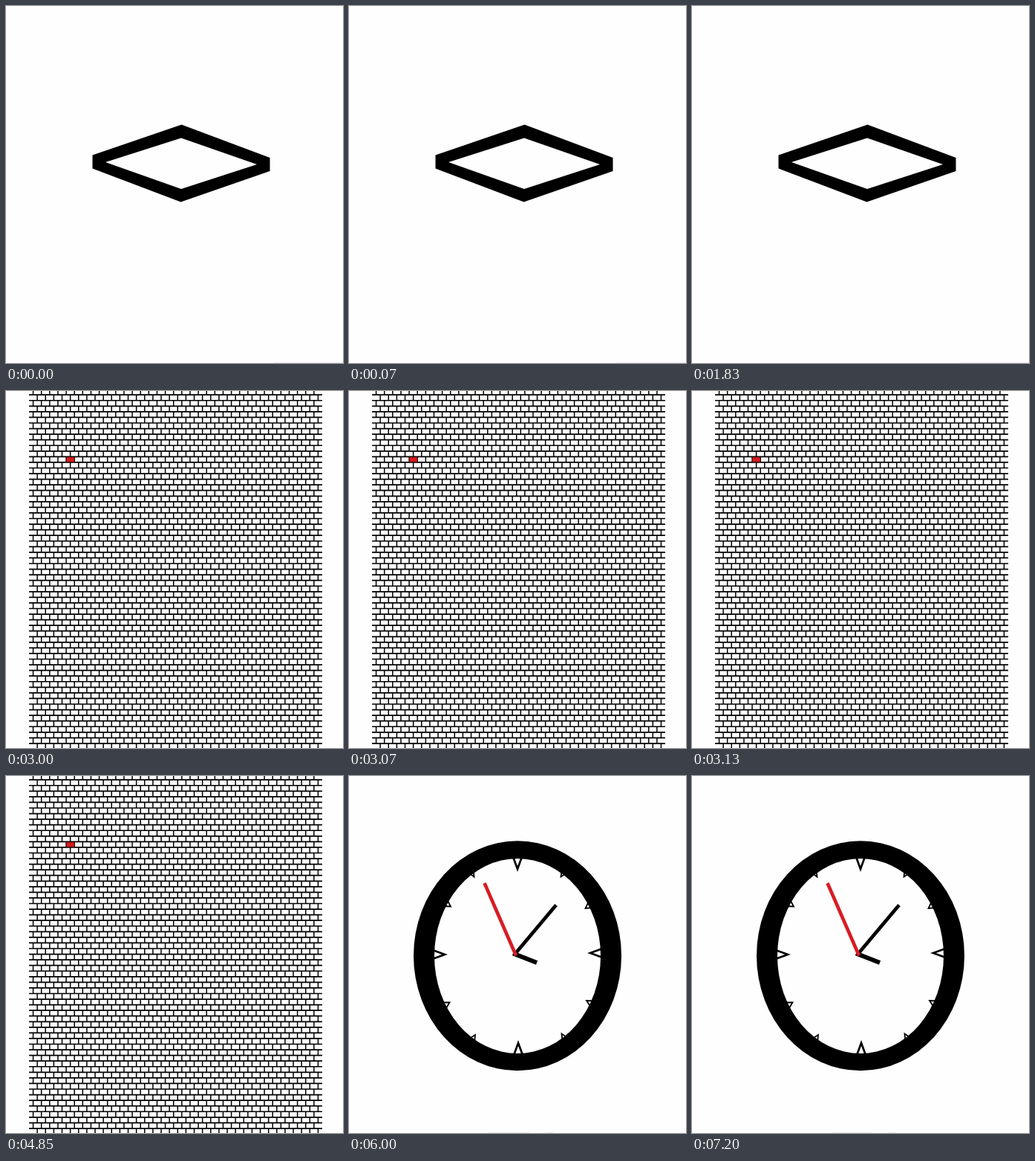
An HTML page that plays this animation: 454 px wide and 480 px high, repeating every 8000 ms.

```html
<!DOCTYPE html>
<html lang="en">
<head>
<meta charset="utf-8">
<title>Diamond, wall, clock</title>
<style>
  html, body { margin: 0; width: 100%; height: 100%; overflow: hidden; background: #fefefe; }
  svg { display: block; width: 100%; height: 100%; }
</style>
</head>
<body>
<svg viewBox="0 0 454 480">
  <rect width="454" height="480" fill="#fefefe"/>

  <g id="diamond">
    <path fill-rule="evenodd" d="M236.5 159.5L355.5 204V222L235.5 263.5L116.5 218.5V200.5Z
      M236 177.5L134 210L236 246L338 213Z"/>
    <path d="M361 479.5H453" stroke="#ececec"/>
  </g>

  <g id="wall">
    <path id="beds" fill="none" stroke="#000" stroke-width="1.7"/>
    <path id="joints" fill="none" stroke="#000" stroke-width="1.5"/>
    <rect id="brick" fill="#d71a1c" stroke="#3a0808" stroke-width=".5"/>
  </g>

  <g id="clock">
    <ellipse cx="227" cy="241.7" rx="140" ry="154.5"/>
    <ellipse cx="227" cy="242" rx="112" ry="131" fill="#fefefe"/>
    <path id="marks" fill="none" stroke="#000" stroke-width="2.7"/>
    <path id="smallMarks" fill="none" stroke="#000" stroke-width="1.8"/>
    <path d="M221 238.5L253 251" stroke="#000" stroke-width="6"/>
    <path d="M223 240L279 173.5" stroke="#000" stroke-width="4.8"/>
    <path d="M182.5 144L225 241.5" stroke="#d71c24" stroke-width="4.6"/>
    <path d="M188 479.5H243M265 479.5H275" stroke="#ececec"/>
  </g>
</svg>
<script>
const LOOP = 8000;
const scenes = [
  { id: "diamond", start: 0 },
  { id: "wall", start: 3000 },
  { id: "clock", start: 6000 }
];
const get = id => document.getElementById(id);

function buildWall() {
  const left = 31, right = 426, top = 5.2;
  const rowHeight = 7.56, brickWidth = (right - left) / 35.5;
  let beds = "", joints = "";
  for (let row = 0; row < 64; row++) {
    const y = top + row * rowHeight;
    beds += `M${left} ${y}H${right}`;
    // Even rows start with half a brick; the wall's sides stay open.
    const first = row % 2 ? brickWidth : brickWidth / 2;
    for (let x = left + first; x < right - 1; x += brickWidth) {
      joints += `M${x} ${y - rowHeight}V${y}`;
    }
  }
  get("beds").setAttribute("d", beds);
  get("joints").setAttribute("d", joints);

  const box = {
    x: left + 4.5 * brickWidth + 0.2,
    y: top + 11 * rowHeight + 0.6,
    width: brickWidth - 0.4,
    height: rowHeight - 1.1
  };
  for (const key in box) get("brick").setAttribute(key, box[key]);
}

function buildMarks() {
  const draw = (id, list) =>
    get(id).setAttribute("d", list.map(points => "M" + points).join(""));
  draw("marks", [
    "221.5 110L227 125L232.5 110",
    "222.5 374L228 359L233.5 374",
    "114 234.5L129 240L114 245.5",
    "340 232.5L325 238L340 243.5"
  ]);
  draw("smallMarks", [
    "161 130L168.5 135.5L167.5 126",
    "286.5 126L285.5 135.5L294 130",
    "132.5 167L137 175.5L127 175",
    "322.5 169.5L318.5 178L328 177",
    "126 304.5L135.5 304.5L131 312",
    "161 354L170 348L169 359",
    "287.5 357L286.5 346.5L295 352.5",
    "325.5 310.5L320 302L330 302.5"
  ]);
}

function render(now) {
  const time = now % LOOP;
  scenes.forEach(({ id, start }, i) => {
    const end = i + 1 < scenes.length ? scenes[i + 1].start : LOOP;
    get(id).style.display = time >= start && time < end ? "" : "none";
  });
}

buildWall();
buildMarks();
const begin = performance.now();
function tick() {
  render(performance.now() - begin);
  requestAnimationFrame(tick);
}
tick();
</script>
</body>
</html>
```
